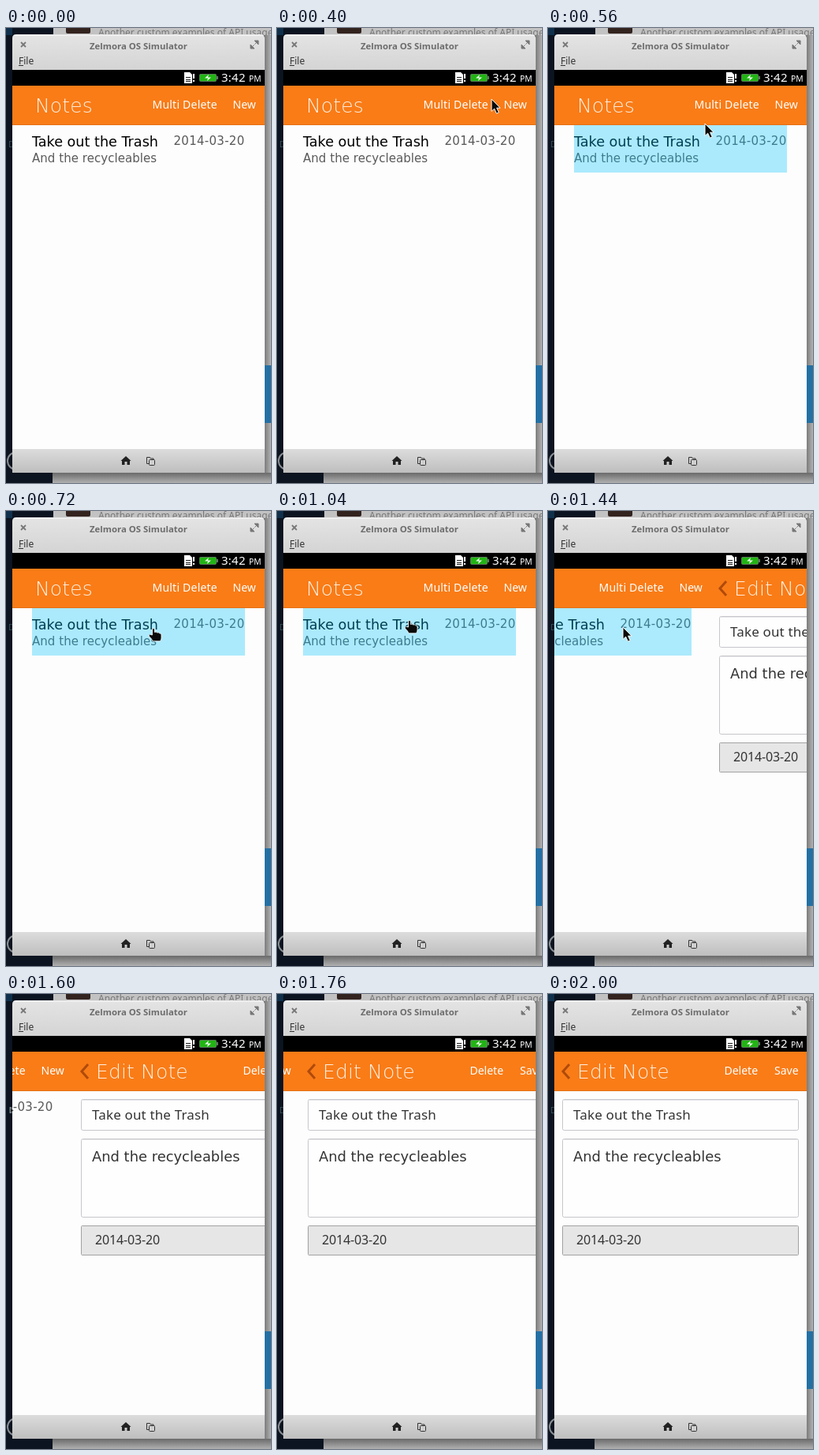
An HTML page that plays this animation: 336 px wide and 576 px high, repeating every 2.16 s.

```html
<!DOCTYPE html>
<html lang="en">
<head>
<meta charset="utf-8">
<title>Notes</title>
<style>
html, body { margin: 0; width: 100%; height: 100%; overflow: hidden; background: #0b1420; }
svg { display: block; width: 100vw; height: 100vh; }
text { font-family: "Noto Sans", "Open Sans", sans-serif; white-space: pre; }
.dv { font-family: "DejaVu Sans", sans-serif; }
.head { font: 200 25px "DejaVu Sans Light", "DejaVu Sans", sans-serif; letter-spacing: .15px; fill: #fff0e4; }
.btn { font-size: 14px; fill: #fff; }
.soft { fill: #5a5a5a; }

.slide, .row, .cursor, .arrow, .hand, .edge { animation: 2160ms step-end infinite; }
.slide { animation-name: slide; }
.row { animation-name: row; }
.cursor { animation-name: cursor; }
.arrow { animation-name: arrow; }
.hand { animation-name: hand; }
.edge { animation-name: edge; }

@keyframes slide {
  0% { transform: translateX(0); }
  62.96% { transform: translateX(-43px); }
  66.66% { transform: translateX(-121px); }
  74.07% { transform: translateX(-243px); }
  77.77% { transform: translateX(-277px); }
  81.48% { transform: translateX(-299px); }
  85.18% { transform: translateX(-312px); }
  88.88% { transform: translateX(-318px); }
  92.59%, 100% { transform: translateX(-320px); }
}
@keyframes row {
  0% { opacity: 0; }
  25.92% { opacity: .32; }
  74.07%, 100% { opacity: 0; }
}
@keyframes cursor {
  0% { transform: translate(309px, 158px); }
  14.81% { transform: translate(306px, 118px); }
  18.51% { transform: translate(272px, 90px); }
  22.22% { transform: translate(234px, 84px); }
  25.92% { transform: translate(199px, 121px); }
  29.62% { transform: translate(192px, 140px); }
  33.33% { transform: translate(187px, 149px); }
  37.03% { transform: translate(183px, 147px); }
  40.74% { transform: translate(178px, 144px); }
  44.44% { transform: translate(173px, 141px); }
  48.14% { transform: translate(168px, 139px); }
  51.85% { transform: translate(169px, 141px); }
  55.55% { transform: translate(171px, 145px); }
  59.25% { transform: translate(172px, 148px); }
  62.96% { transform: translate(173px, 151px); }
  66.66% { transform: translate(95px, 147px); }
  74.07%, 100% { transform: translate(5px, 142px); }
}
@keyframes arrow {
  0% { visibility: hidden; }
  3.7% { visibility: visible; }
  33.33% { visibility: hidden; }
  62.96% { visibility: visible; }
  74.07%, 100% { visibility: hidden; }
}
@keyframes hand {
  0% { visibility: hidden; }
  33.33% { visibility: visible; }
  62.96%, 100% { visibility: hidden; }
}
@keyframes edge {
  0% { visibility: hidden; }
  74.07% { visibility: visible; }
  77.77%, 100% { visibility: hidden; }
}
</style>
</head>
<body>
<svg viewBox="0 0 336 576" preserveAspectRatio="none">
  <defs>
    <linearGradient id="bar" x2="0" y2="1">
      <stop offset="0" stop-color="#e4e4e4"/><stop offset="1" stop-color="#d4d4d4"/>
    </linearGradient>
    <linearGradient id="foot" x2="0" y2="1">
      <stop offset="0" stop-color="#dcdcdc"/><stop offset="1" stop-color="#bebebe"/>
    </linearGradient>
    <linearGradient id="below" x2="0" y2="1">
      <stop offset="0" stop-color="#6a6a6a"/><stop offset="1" stop-color="#b0b0b0"/>
    </linearGradient>
    <linearGradient id="side">
      <stop offset="0" stop-color="#7c7c7c"/><stop offset="1" stop-color="#b2b2b2"/>
    </linearGradient>
    <clipPath id="screen"><path d="M8 73h320v460H8z"/></clipPath>
  </defs>

  <!-- desktop behind the window -->
  <path fill="#0b1420" d="M0 0h336v576H0z"/>
  <path fill="#c2c2c2" d="M60 0h276v9H60z"/>
  <path fill="#10304c" d="M0 0h8v9H0z"/>
  <rect x="76" y="-4" width="31" height="11" rx="2" fill="#33231f"/>
  <text x="117" y="10" font-size="12" fill="#777">Another custom examples of API usage</text>
  <path fill="url(#side)" d="M328 9h8v567h-8z"/>
  <path fill="#2470a4" d="M328 427h8v73h-8z"/>
  <path fill="url(#below)" d="M59 563h277v13H59z"/>
  <circle cx="13" cy="548" r="11" fill="none" stroke="#8a8e92" stroke-width="2"/>
  <text x="3" y="151" font-size="10" fill="#35505a">D</text>

  <!-- window frame -->
  <path fill="url(#bar)" d="M8 53V13q0-5 5-5h310q5 0 5 5v40z"/>
  <path fill="url(#foot)" d="M8 533h320v30H8z"/>
  <path fill="none" stroke="#f4f4f4" d="M10 9.500h316"/>
  <text x="168" y="26.500" font-size="11.400" font-weight="700" text-anchor="middle" fill="#6c6c6c">Zelmora OS Simulator</text>
  <path d="M19 18l6 6m0-6l-6 6" stroke="#777" stroke-width="1.800"/>
  <path d="M315 16h5v5zM310 21v5h5zM318 18l-2.500 2.500M312 24l2.500-2.500" fill="#777" stroke="#777"/>
  <text x="16" y="46" font-size="12" fill="#333">File</text>
  <path d="M16 47.500h6" stroke="#333"/>

  <!-- status bar -->
  <path d="M8 53h320v20H8z"/>
  <path fill="#fff" d="M226 56h7l3 3v11h-10z"/>
  <path d="M228 62.500h6M228 65.500h6M228 67.500h6" stroke="#222"/>
  <path fill="#fff" d="M237 58h2v6h-2zM237 66h2v2h-2z"/>
  <rect x="245.500" y="58.500" width="21" height="9" rx="1" fill="#22b414" stroke="#5a7a5a"/>
  <path fill="#5a7a5a" d="M267 61h2v4h-2z"/>
  <path fill="#f0fff0" d="M257 59l-5 4.500h4l-1 3.500 5-4.500h-4z"/>
  <text x="273" y="68" font-size="15" letter-spacing=".25" fill="#fff">3:42</text>
  <text x="308" y="68" font-size="10.300" fill="#fff">PM</text>

  <!-- two pages side by side -->
  <g clip-path="url(#screen)">
    <path fill="#fdfdfd" d="M8 73h320v460H8z"/>
    <path fill="#f97c17" d="M8 73h320v50H8z"/>
    <path fill="#e47014" d="M8 122h320v1H8z"/>
    <g class="slide">
      <g>
        <text class="head" x="37" y="107">Notes</text>
        <text class="btn" x="185.500" y="102" letter-spacing=".22">Multi Delete</text>
        <text class="btn" x="287.500" y="102">New</text>
        <text class="dv" x="33" y="150" font-size="17.600">Take out the Trash</text>
        <text class="dv soft" x="212.500" y="148" font-size="15" letter-spacing=".28">2014-03-20</text>
        <text class="dv soft" x="33" y="170" font-size="15" letter-spacing=".05">And the recycleables</text>
        <path class="row" fill="#00c4ff" d="M33 123h270v60H33z"/>
      </g>
      <g transform="translate(320 0)">
        <path d="M27 89l-8 9 8 9" fill="none" stroke="#b04a0c" stroke-width="3"/>
        <text class="head" x="37" y="107">Edit Note</text>
        <text class="btn" x="223.500" y="102">Delete</text>
        <text class="btn" x="287" y="102">Save</text>
        <g fill="#fefefe" stroke="#c6c6cc">
          <rect x="18.500" y="133.500" width="299" height="39" rx="2"/>
          <rect x="18.500" y="183.500" width="299" height="99" rx="2"/>
          <rect x="18.500" y="293.500" width="299" height="37" rx="1" fill="#e6e6e6" stroke="#a2a2a2"/>
        </g>
        <path d="M20 134.500h296M20 184.500h296" stroke="#e6e6ea"/>
        <g fill="#333">
          <text x="32" y="159" font-size="17" letter-spacing=".15">Take out the Trash</text>
          <text class="dv" x="32" y="212" font-size="17.900">And the recycleables</text>
          <text x="36" y="317" font-size="16" letter-spacing="-.15">2014-03-20</text>
        </g>
      </g>
    </g>
  </g>

  <!-- bottom bar -->
  <path fill="#222" d="M152 542l6.500 6H157v5h-3.500v-4h-3v4H147v-5h-1.500z"/>
  <g fill="#cfcfcf" stroke="#333">
    <path d="M178.500 551.500v-8h4l1 1.500h3.500v6.500z"/>
    <rect x="181.500" y="546.500" width="7" height="7" rx="1"/>
  </g>

  <g class="cursor">
    <path class="arrow" d="M0 0v15.500l3.600-3.300 2.700 6 3-1.300-2.700-5.700H11z" fill="#0a0a0a" stroke="#fff"/>
    <path class="hand" fill="#0a0a0a" stroke="#fff" stroke-width=".8"
      d="M-1.500 8V1q0-1.500 1.500-1.500T1.500 1v3.500q2-1 3 .5 2-.8 3 .8 2.500-.3 2.500 2v4q0 2-1.500 4H-1q-1-3-4.500-6-1-2 1-2.500z"/>
    <path class="edge" d="M.5 1v8l3.500-3.500z" fill="#101418" stroke="#85898c"/>
  </g>
</svg>
</body>
</html>
```
